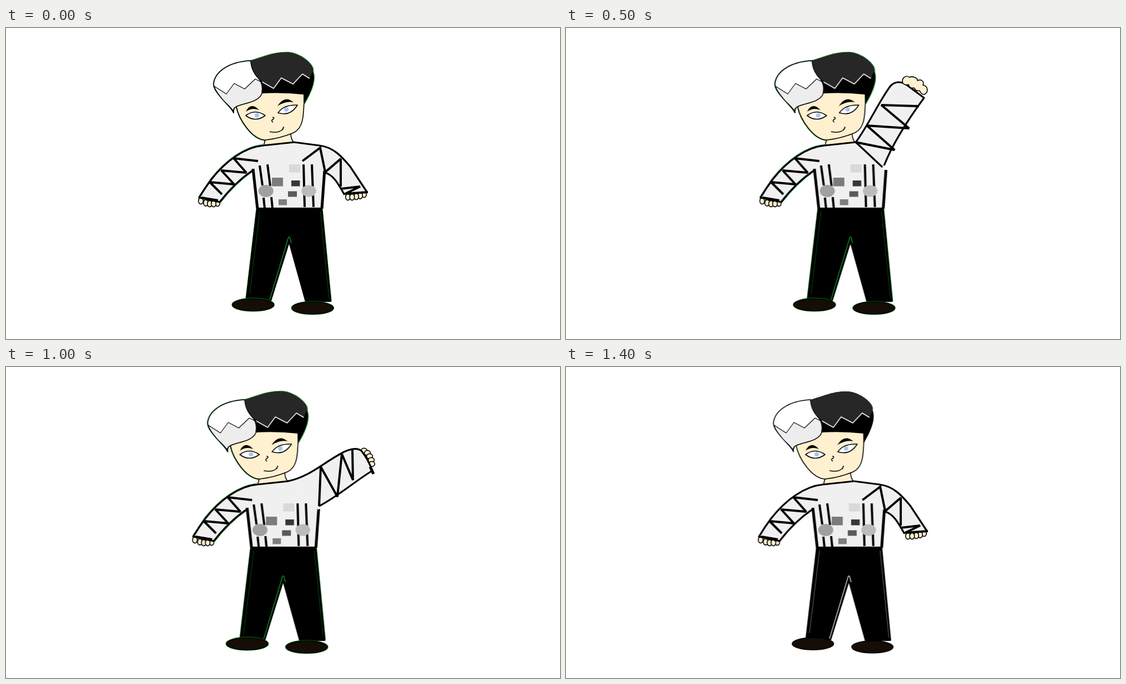
These frames come from a looping animation (998 by 561 pixels, 1.5 s). An HTML page:

```html
<!DOCTYPE html>
<html lang="en">
<head>
<meta charset="utf-8">
<title>Waving figure</title>
<style>
html, body { margin: 0; width: 100%; height: 100%; overflow: hidden; background: #fff; }
svg { display: block; width: 100vw; height: 100vh; }
path, .line { fill: none; stroke: #000; stroke-width: 1.6; stroke-linejoin: round; }
.skin { fill: #fff0cf; }
.white { fill: #fff; }
.shoe { fill: #150d06; }
.cloth { fill: #f0f0f0; stroke: none; }
.limb { stroke-width: 3.2; }
.band { stroke-width: 4; stroke-linejoin: miter; stroke-miterlimit: 2; }
.side { stroke-width: 5; }
.solid { fill: #000; stroke: none; }
.rim { stroke: #0a8a1c; stroke-width: 3.2; animation: rim 1.5s step-end infinite; }
.seam { stroke: #12a52a; stroke-width: 1.2; animation: seam 1.5s step-end infinite; }
.faint { stroke-width: .9; opacity: .5; }
#body { animation: shift 1.5s step-end infinite; }
.pose { visibility: hidden; animation: 1.5s step-end infinite; }
#down { animation-name: down; }
#low { animation-name: low; }
#level { animation-name: level; }
#mid { animation-name: mid; }
#high { animation-name: high; }
#top { animation-name: top; }

/* the figure slides so that its reach stays centred */
@keyframes shift {
  0% { transform: translateX(0); }
  6.66%, 80% { transform: translateX(-9.2px); }
  13.33%, 73.33% { transform: translateX(-20.5px); }
  19.99%, 66.66% { transform: translateX(-10.7px); }
  26.66%, 39.99%, 53.33% { transform: translateX(-12.6px); }
  33.33%, 46.66%, 59.99% { transform: translateX(2.4px); }
  93.33%, 100% { transform: translateX(-.4px); }
}
@keyframes down { 0%, 93.33%, 100% { visibility: visible; } 6.66% { visibility: hidden; } }
@keyframes low { 0%, 13.33%, 93.33%, 100% { visibility: hidden; } 6.66%, 80% { visibility: visible; } }
@keyframes level { 0%, 19.99%, 80%, 100% { visibility: hidden; } 13.33%, 73.33% { visibility: visible; } }
@keyframes mid { 0%, 26.66%, 73.33%, 100% { visibility: hidden; } 19.99%, 66.66% { visibility: visible; } }
@keyframes high {
  0%, 33.33%, 46.66%, 59.99%, 100% { visibility: hidden; }
  26.66%, 39.99%, 53.33% { visibility: visible; }
}
@keyframes top {
  0%, 39.99%, 53.33%, 66.66%, 100% { visibility: hidden; }
  33.33%, 46.66%, 59.99% { visibility: visible; }
}
@keyframes rim { 0% { opacity: .85; } 93.33%, 100% { opacity: 0; } }
@keyframes seam { 0% { stroke: #12a52a; } 93.33%, 100% { stroke: #f4f4f4; } }
</style>
</head>
<body>
<svg viewBox="0 0 998 561" preserveAspectRatio="none">
  <defs>
    <ellipse id="tip" class="line skin" rx="4.3" ry="5.6"/>
    <ellipse id="knuckle" class="line skin" rx="5.4" ry="4.6"/>
  </defs>

  <g id="body">
    <!-- trousers and shoes -->
    <path class="rim" style="stroke-width:3.6" d="M452 328L433 489M569 328L585 493"/>
    <path style="fill:#000;stroke-width:2.2" d="M452 326H569L585 493L540 494L510 386L477 492L433 489Z"/>
    <path class="limb" d="M475 491L510 379L541 494"/>
    <path class="seam" d="M475 490L509 377H511L514 388"/>
    <path class="seam faint" d="M457 331L439 480M566 331L582 488"/>
    <ellipse class="line rim" cx="445.2" cy="499.2" rx="37.3" ry="11"/>
    <ellipse class="line rim" cx="552.4" cy="505" rx="37.3" ry="11"/>
    <ellipse class="line shoe" cx="445.2" cy="499.2" rx="37.3" ry="11"/>
    <ellipse class="line shoe" cx="552.4" cy="505" rx="37.3" ry="11"/>

    <!-- neck and face -->
    <path class="skin" d="M467 201L464 213L519 207Q513 201 513 190"/>
    <path class="rim" style="stroke-width:2.8" d="M415 142C420 166 444 202 468 202"/>
    <path class="skin" d="M415 142C420 166 444 202 468 202C486 200 506 194 518 189C534 181 537 165 537 118L461 110Z"/>

    <!-- hair -->
    <path class="rim" style="stroke-width:2.6" d="M410 153C408 146 398 138 388 126C378 114 374 108 374 101C376 80 400 61 441 59C466 52 480 44 507 44C530 45 556 66 553 79C558 92 552 112 537 137"/>
    <path class="white" d="M410 153C408 146 398 138 388 126C378 114 374 108 374 101C376 80 400 61 441 59C442 80 461 82 461 118C455 134 430 135 416 141Q409 144 410 153Z"/>
    <path style="fill:#ededed;stroke-width:1.2" d="M375 105L397 119L411 100L430 110L449 92L461 98Q462 108 461 118C455 134 430 135 416 141Q409 144 409 150C407 144 396 136 388 126Q377 113 375 105Z"/>
    <path class="solid" d="M441 59C466 52 480 44 507 44C530 45 556 66 553 79C558 92 552 112 537 137L536 120Q500 116 461 118C464 88 442 86 441 59Z"/>
    <path class="solid" style="fill:#272727" d="M441 59C466 52 480 44 507 44C530 45 556 66 553 77L547 91L534 83L517 101L496 90L482 109L461 97C448 86 441 74 441 59Z"/>
    <path style="stroke:#fff;stroke-width:1.5;stroke-linejoin:miter" d="M461 97L482 109L496 90L517 101L534 83L547 91"/>
    <path style="stroke-width:1.3" d="M441 59C441 74 448 86 461 97Q463 106 461 118"/>

    <!-- features -->
    <path class="solid" d="M432 151Q441 132 456 148Q443 143 432 151ZM489 141Q502 120 518 134Q504 131 489 141Z"/>
    <path class="white" d="M432 158Q449 145 467 158Q449 171 432 158ZM490 153Q500 138 525 139Q512 160 490 153Z"/>
    <circle cx="452" cy="157.5" r="4" fill="#a9c5ee"/>
    <circle cx="505" cy="147" r="4" fill="#a9c5ee"/>
    <path d="M480 161Q484 161 482 164Q476 167 481 170M475 187Q490 190 497 184Q500 182 500 178"/>

    <!-- still arm -->
    <use href="#tip" x="351" y="312"/>
    <use href="#tip" x="360" y="315.5"/>
    <use href="#tip" x="381" y="316"/>
    <use href="#tip" x="367" y="317"/>
    <use href="#tip" x="374" y="317"/>
    <path class="rim" style="stroke-width:4.6" d="M463 212C430 215 396 240 370 273L348 306M385 314C405 288 425 270 444 257"/>
    <path class="cloth" d="M463 212C430 215 396 240 370 273Q358 289 348 306L385 314C405 288 425 270 445 257L453 326H569L575 260L563 248L519 206Z"/>
    <path class="limb" d="M519 206L463 212C430 215 396 240 370 273Q358 289 348 306L385 314C405 288 425 270 444 257"/>
    <path class="band" d="M454 240L410 235L433 261L388 257L411 282L367 278L389 300M352 306L382 311"/>

    <!-- shirt -->
    <path class="side" d="M445 254L453 326M574 256L569 326"/>
    <path class="band" d="M451 326H570"/>
    <path class="band" d="M457 248L462 284M464 306L466 325M471 246L476 285M478 305L480 325M536 246L538 323M551 246L554 323"/>
    <ellipse cx="468.3" cy="294" rx="13.5" ry="11" fill="#a0a0a0"/>
    <ellipse cx="545.5" cy="294" rx="13.2" ry="10.5" fill="#bbb"/>
    <rect x="510" y="246" width="20" height="14.5" fill="#d9d9d9"/>
    <rect x="479" y="270" width="20" height="15.5" fill="#7c7c7c"/>
    <rect x="514" y="275" width="15.5" height="10.5" fill="#383838"/>
    <rect x="508" y="294.5" width="16" height="10" fill="#5a5a5a"/>
    <rect x="491" y="309" width="15" height="10.5" fill="#7f7f7f"/>
  </g>

  <!-- waving arm -->
  <g id="down" class="pose">
    <use href="#tip" x="616" y="305"/>
    <use href="#tip" x="645" y="300"/>
    <use href="#tip" x="638" y="302.5"/>
    <use href="#tip" x="631" y="304"/>
    <use href="#tip" x="623.5" y="305"/>
    <path class="cloth" d="M519 206L565 212C590 215 605 232 620 250L651 297L610 301C600 285 592 266 575 261L563 248Z"/>
    <path class="limb" d="M519 206L565 212C590 215 605 232 620 250L651 297M610 301C600 285 592 266 575 261"/>
    <path class="band" d="M534 240L566 216L575 260L603 236V286M603 290L638 286L611 299L652 296"/>
  </g>

  <g id="low" class="pose">
    <use href="#knuckle" x="655" y="251"/>
    <use href="#knuckle" x="653" y="258"/>
    <use href="#knuckle" x="649.5" y="264"/>
    <use href="#knuckle" x="646" y="269"/>
    <use href="#knuckle" x="641" y="274"/>
    <path class="cloth" d="M509 206C550 211 570 214 600 222Q630 231 661 241L631 272C605 264 585 262 566 262L554 248Z"/>
    <path class="limb" d="M509 206C550 211 570 214 600 222Q630 231 661 241L631 272C605 264 585 262 566 262"/>
    <path class="band" d="M525 239L557 216L565 258L604 224M604 220V269M606 266L646 234"/>
    <path class="solid" d="M647 238L663 240L653 249Z"/>
  </g>

  <g id="level" class="pose">
    <use href="#knuckle" x="667" y="208"/>
    <use href="#knuckle" x="668" y="215"/>
    <use href="#knuckle" x="668" y="222"/>
    <use href="#knuckle" x="667" y="229"/>
    <use href="#knuckle" x="664.5" y="236"/>
    <path class="cloth" d="M498 207C530 210 570 205 610 200Q640 196 664 201L657 239C620 240 590 246 556 251L554 258L543 248Z"/>
    <path class="limb" d="M498 207C530 210 570 205 610 200Q640 196 664 201L657 239C620 240 590 246 556 251"/>
    <path class="band" d="M555 252L576 206M578 206V253M580 248L612 201M614 204L626 241M633 239L668 195M656 199L672 201"/>
  </g>

  <g id="mid" class="pose">
    <use href="#knuckle" x="645" y="151"/>
    <use href="#knuckle" x="651" y="155"/>
    <use href="#knuckle" x="655" y="161"/>
    <use href="#knuckle" x="658" y="168"/>
    <use href="#knuckle" x="659" y="175"/>
    <path class="cloth" d="M508 206C545 198 565 178 600 158C615 149 630 144 640 151L660 187C630 205 600 232 564 251L563 258L552 248Z"/>
    <path class="limb" d="M508 206C545 198 565 178 600 158C615 149 630 144 640 151Q652 166 660 187C630 205 600 232 564 251"/>
    <path class="band" d="M564 251L567 180L597 234L605 157L625 204L624 149"/>
    <path class="side" d="M656 180L662 193"/>
  </g>

  <g id="high" class="pose">
    <path class="cloth" d="M506 207Q520 208 537 193C560 170 580 140 607 114L614 113L646 147C620 175 590 215 560 246L561 258L550 248Z"/>
    <path class="limb" d="M506 207Q520 208 537 193C560 170 580 140 607 114L614 113M646 147C620 175 590 215 560 246"/>
    <path class="band" d="M560 246L536 194L592 210L558 169L620 181M617 175L598 128"/>
    <path class="limb" d="M604 106L628 126M642 145L655 155"/>
    <path class="skin" d="M617 111C617 104 628 102 632 109C640 107 645 113 641 119C649 119 650 127 647 130C654 133 652 146 643 147Q636 145 636 138Q628 137 629 129Q622 127 624 120Q617 118 617 111Z"/>
    <circle class="line skin" cx="661.5" cy="312" r="4.6"/>
  </g>

  <g id="top" class="pose">
    <path class="cloth" d="M522 206C545 175 565 130 585 104Q595 94 610 100L645 126C620 160 590 205 573 248L570 251Z"/>
    <path class="limb" d="M522 206C545 175 565 130 585 104Q595 94 610 100L645 126C620 160 590 205 573 248M522 206L570 251"/>
    <path class="band" d="M522 206L592 220L542 176L618 181L568 139L636 141"/>
    <path class="skin" d="M607 100C603 90 613 84 619 89C624 86 634 90 633 95C640 91 646 97 643 103C652 104 654 116 645 120Q640 120 637 113Q631 115 627 108Q619 110 617 102Q611 104 607 100Z"/>
  </g>
</svg>
</body>
</html>
```
